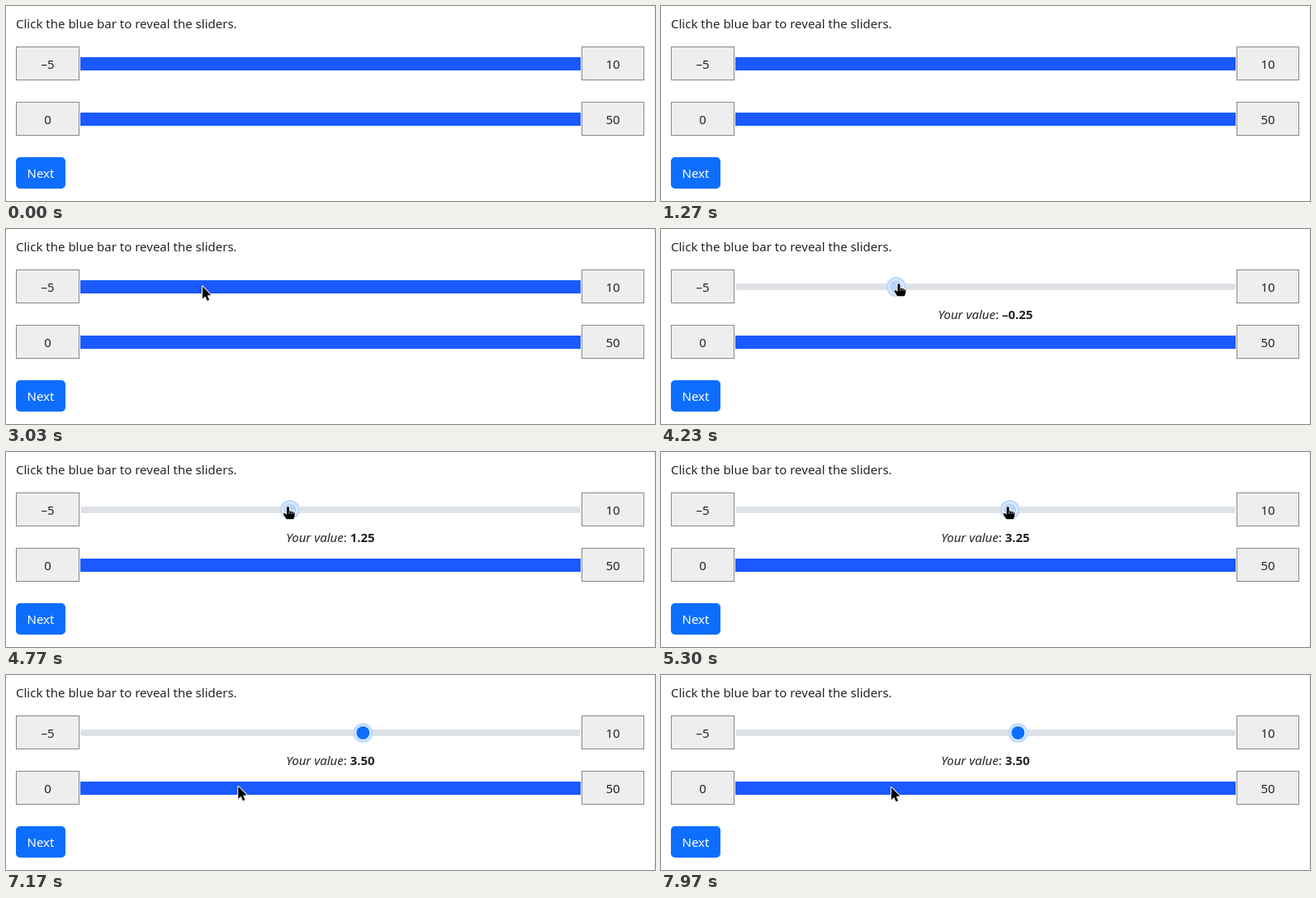
Recreate the animation shown at these times as an HTML page with a canvas. Size 786 by 236 pixels, loop 8000 ms.

```html
<!DOCTYPE html>
<html lang="en">
<head>
<meta charset="utf-8">
<title>Sliders</title>
<style>
  html, body { margin: 0; width: 100%; height: 100%; overflow: hidden; background: #fff; }
  canvas { display: block; }
</style>
</head>
<body>
<canvas id="stage" width="786" height="236"></canvas>
<script>
const ctx = document.getElementById('stage').getContext('2d');
const LOOP = 8000;
const FONT = '15px "Noto Sans", sans-serif';
const INK = '#212529';
const REVEAL = 3200, PRESS = 3560, RELEASE = 5880;
const TRACK = { x: 90, w: 606, y: 70 };
const THUMB_R = 8;

// Pointer path: time, x, y
const PATH = [
  [1600, 316, 238], [1730, 308, 212], [2070, 275.5, 128], [2540, 238, 72],
  [3030, 237.5, 68.5], [3560, 237, 67.5], [4180, 288, 67], [4300, 288, 67],
  [5300, 420, 67], [5620, 432, 68], [6050, 432, 68],
  [6570, 367, 93], [7250, 278.5, 135], [8000, 278.5, 135]
];

const ARROW = [[.5, 1], [.5, 16], [3.8, 12.9], [6.2, 18.3], [8.7, 17.2], [6.3, 11.9], [10.8, 11.6]];
const HAND = [
  [-1.5, 0], [-.7, -.8], [.7, -.8], [1.5, 0], [1.5, 4.6], [4, 4.8], [6.3, 5.6], [8.3, 6.8],
  [8.3, 10.5], [6.8, 14.2], [-1.8, 14.2], [-5.6, 8.6], [-5, 7], [-3.6, 7], [-1.5, 9]
];

function slope(a, b, k) {
  return (b[k] - a[k]) / (b[0] - a[0]);
}

// Smooth tangent that never overshoots a key
function tangent(i, k) {
  if (i === 0) return slope(PATH[0], PATH[1], k);
  if (i === PATH.length - 1) return 0;
  const p = slope(PATH[i - 1], PATH[i], k);
  const n = slope(PATH[i], PATH[i + 1], k);
  return p * n <= 0 ? 0 : 2 * p * n / (p + n);
}

function pointerAt(t) {
  if (t < PATH[0][0]) return null;
  let i = 0;
  while (i < PATH.length - 2 && t >= PATH[i + 1][0]) i++;
  const a = PATH[i], b = PATH[i + 1], d = b[0] - a[0];
  const u = (t - a[0]) / d, u2 = u * u, u3 = u2 * u;
  const [x, y] = [1, 2].map(k =>
    (2 * u3 - 3 * u2 + 1) * a[k] + (u3 - 2 * u2 + u) * d * tangent(i, k) +
    (3 * u2 - 2 * u3) * b[k] + (u3 - u2) * d * tangent(i + 1, k));
  return { x, y };
}

function thumbX(value) {
  return TRACK.x + THUMB_R + (value + 5) / 15 * (TRACK.w - 2 * THUMB_R);
}

function valueAt(t) {
  const dragTime = Math.min(Math.max(t, PRESS), RELEASE);
  const x = pointerAt(dragTime).x;
  const raw = (x - TRACK.x - THUMB_R) / (TRACK.w - 2 * THUMB_R) * 15 - 5;
  return Math.round(raw * 4) / 4;
}

function text(str, x, y, { style = '', color = INK, align = 'left' } = {}) {
  ctx.font = `${style} ${FONT}`;
  ctx.fillStyle = color;
  ctx.textAlign = align;
  ctx.fillText(str, x, y);
}

function rect(x, y, w, h, color, r = 0) {
  ctx.fillStyle = color;
  ctx.beginPath();
  ctx.roundRect(x, y, w, h, r);
  ctx.fill();
}

function disc(x, y, r, color) {
  ctx.fillStyle = color;
  ctx.beginPath();
  ctx.arc(x, y, r, 0, 2 * Math.PI);
  ctx.fill();
}

function endBox(x, y, w, label) {
  rect(x, y, w, 41, '#888');
  rect(x + 1, y + 1, w - 2, 39, '#eee');
  text(label, x + w / 2, y + 27, { align: 'center' });
}

function valueLabel(value) {
  const num = (value < 0 ? '–' : '') + Math.abs(value).toFixed(2);
  const parts = [['Your value', 'italic'], [': ', ''], [num, 'bold']];
  const widths = parts.map(([str, style]) => {
    ctx.font = `${style} ${FONT}`;
    return ctx.measureText(str).width;
  });
  let x = 393 - widths.reduce((a, b) => a + b) / 2;
  parts.forEach(([str, style], i) => {
    text(str, x, 109, { style });
    x += widths[i];
  });
}

function slider(t, value) {
  const x = thumbX(value), active = t >= PRESS && t < RELEASE;
  rect(TRACK.x, 66, TRACK.w, 8, '#dee2e6', 4);
  if (t >= PRESS) {
    disc(x, TRACK.y, 12, '#c2dbfe');
    disc(x, TRACK.y, 9, '#fff');
  }
  disc(x, TRACK.y, THUMB_R, active ? '#b6d4fe' : '#0d6efd');
  valueLabel(value);
}

function outline(points) {
  ctx.beginPath();
  points.forEach(([x, y]) => ctx.lineTo(x, y));
  ctx.closePath();
  ctx.lineJoin = 'round';
  ctx.lineWidth = 2;
  ctx.strokeStyle = '#fff';
  ctx.stroke();
  ctx.fillStyle = '#000';
  ctx.fill();
}

function hand() {
  outline(HAND);
  ctx.lineWidth = .6;
  ctx.beginPath();
  for (const x of [1.6, 4, 6.3]) {
    ctx.moveTo(x, 5.2);
    ctx.lineTo(x, 8);
  }
  ctx.stroke();
}

function beam() {
  const strokes = [['#fff', 3], ['#000', 1]];
  for (const [color, width] of strokes) {
    ctx.strokeStyle = color;
    ctx.lineWidth = width;
    ctx.beginPath();
    ctx.moveTo(-3, -7.5);
    ctx.lineTo(3, -7.5);
    ctx.moveTo(0, -7.5);
    ctx.lineTo(0, 7.5);
    ctx.moveTo(-3, 7.5);
    ctx.lineTo(3, 7.5);
    ctx.stroke();
  }
}

function pointer(t, value) {
  const p = pointerAt(t);
  if (!p) return;
  const shown = t >= REVEAL;
  const onThumb = shown && Math.hypot(p.x - thumbX(value), p.y - TRACK.y) < 9;
  const onText = shown && p.x > 335 && p.x < 452 && p.y > 91 && p.y < 115;
  ctx.save();
  if (onText) {
    ctx.translate(Math.round(p.x) + .5, Math.round(p.y) + .5);
    beam();
  } else {
    ctx.translate(p.x, p.y);
    if (onThumb) hand(); else outline(ARROW);
  }
  ctx.restore();
}

function draw(t) {
  rect(0, 0, 786, 236, '#fff');
  rect(785, 0, 1, 236, '#ebebee');
  text('Click the blue bar to reveal the sliders.', 12, 27);

  endBox(12, 49, 77, '–5');
  endBox(697, 49, 76, '10');
  endBox(12, 116, 77, '0');
  endBox(697, 116, 76, '50');

  const value = valueAt(t);
  if (t < REVEAL) rect(TRACK.x, 62, TRACK.w, 16, '#1a5aff');
  else slider(t, value);
  rect(TRACK.x, 129, TRACK.w, 16, '#1a5aff');

  rect(12, 183, 60, 38, '#0d6efd', 5);
  text('Next', 42, 208, { color: '#fff', align: 'center' });
  pointer(t, value);
}

const start = performance.now();
function tick() {
  draw((performance.now() - start) % LOOP);
  requestAnimationFrame(tick);
}
tick();
</script>
</body>
</html>
```
